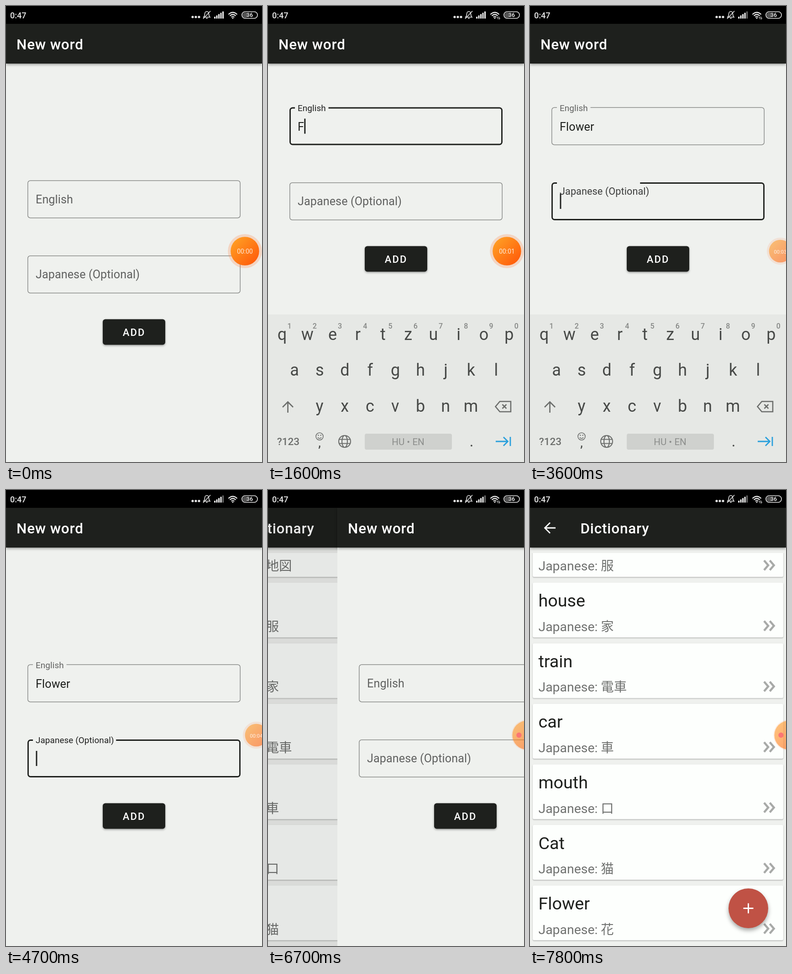
Animation of 561 by 998 pixels, one loop 8000 ms. Source, as an HTML page with a canvas:

```html
<!DOCTYPE html>
<html lang="en">
<head>
<meta charset="utf-8">
<title>New word</title>
<style>
html, body { margin: 0; width: 100%; height: 100%; overflow: hidden; background: #eff1ee; }
canvas { display: block; }
</style>
</head>
<body>
<canvas id="stage" width="561" height="998"></canvas>
<script>
const W = 561, H = 998, LOOP = 8000;
const c = document.getElementById('stage').getContext('2d');
const INK = '#1e201d', PAPER = '#eff1ee', KEY = '#474947', SOFT = '#6c6e6c';
const FONT = 'Roboto, "Noto Sans CJK JP", "Noto Sans CJK", sans-serif';

// Words come from a dictionary list; typed letters appear when their key is released.
const WORDS = [['map', '地図'], ['clothes', '服'], ['house', '家'], ['train', '電車'],
  ['car', '車'], ['mouth', '口'], ['Cat', '猫'], ['Flower', '花']];
const TYPED = [1450, 2000, 2250, 2500, 2720, 2900];
const ROWS = [['qwertzuiop', 31, 719], ['asdfghjkl', 58, 797], ['yxcvbnm', 113, 876]];
const FOCUS_EN = 60, FOCUS_JA = 3520, CLEAR = 5760;

const ramp = (t, a, b) => Math.min(1, Math.max(0, (t - a) / (b - a)));
const smooth = u => u * u * (3 - 2 * u);
const easeOut = u => 1 - (1 - u) ** 3;
const mix = (a, b, u) => a + (b - a) * u;

function text(s, x, y, size, color, { weight = 400, align = 'left', space = 0 } = {}) {
  c.font = `${weight} ${size}px ${FONT}`;
  c.letterSpacing = space + 'px';
  c.textAlign = align;
  c.fillStyle = color;
  c.fillText(s, x, y);
  c.letterSpacing = '0px';
}
function box(x, y, w, h, r, color) {
  c.beginPath();
  c.roundRect(x, y, w, h, r);
  c.fillStyle = color;
  c.fill();
}
function disc(x, y, r, color) {
  c.beginPath();
  c.arc(x, y, r, 0, 7);
  c.fillStyle = color;
  c.fill();
}
function line(path, color, width, dx = 0, dy = 0) {
  c.save();
  c.translate(dx, dy);
  c.strokeStyle = color;
  c.lineWidth = width;
  c.stroke(new Path2D(path));
  c.restore();
}
function shadowed(blur, dy, alpha, draw) {
  c.save();
  c.shadowColor = `rgba(0,0,0,${alpha})`;
  c.shadowBlur = blur;
  c.shadowOffsetY = dy;
  draw();
  c.restore();
}
function shifted(x, y, draw) {
  c.save();
  c.translate(x, y);
  draw();
  c.restore();
}

function statusBar(t) {
  c.fillStyle = '#000';
  c.fillRect(0, 0, W, 39);
  const ink = '#e8e8e8';
  text('0:47', 9, 26.5, 18, ink, { weight: 500 });
  for (let i = 0; i < 3; i++) disc(409 + i * 7, 24, 2.6, ink);
  line('M433 24.5h14c-2-2-2.500-4-2.500-6.500c0-8-9-8-9 0c0 2.500-.5 4.500-2.500 6.500zM438 27h4M432 28L448 11', ink, 1.6);
  for (let i = 0; i < 5; i++) {
    const h = 4 + i * 2.9;
    c.fillStyle = i == 4 && t > 1800 ? '#666' : ink;
    c.fillRect(456 + i * 4.5, 27.5 - h, 3.2, h);
  }
  line('M487.500 18.500q9.500-9 19 0M490.500 21.500q6.500-6 13 0', ink, 2.2);
  line('M493.500 24.500q3.500-3 7 0', ink, 2);
  disc(497, 26.500, 1.500, ink);
  if ((t > 800 && t < 4100) || t >= 6400) {
    c.fillStyle = '#000';
    c.fillRect(501, 22, 9, 8);
    line('M504 29v-5l-1.500 2M507 23.500v5l1.500-2', ink, 1.1);
  }
  box(518.5, 14.5, 12, 11, 5, '#555');
  c.beginPath();
  c.roundRect(517, 12.5, 34, 14.5, 7);
  c.strokeStyle = ink;
  c.lineWidth = 1.6;
  c.stroke();
  text('36', 534, 24.3, 12.5, '#fff', { weight: 500, align: 'center' });
}

function header(title, x) {
  shadowed(6, 2, .4, () => {
    c.fillStyle = INK;
    c.fillRect(0, 39, W, 87);
  });
  text(title, x, 95, 31.4, '#fff', { weight: 500, space: .85 });
}

function field(y, label, value, t, on, off) {
  const active = t >= on && t < off, raised = t >= on && t < CLEAR;
  const p = smooth(ramp(t, on, on + 150)) * (1 - smooth(ramp(t, CLEAR, CLEAR + 150)));
  const lw = active ? 2.9 : 1.5;
  c.beginPath();
  c.roundRect(47 + lw / 2, y + lw / 2, 467 - lw, 83 - lw, 5.5);
  c.strokeStyle = active ? INK : '#8b8d8b';
  c.lineWidth = lw;
  c.stroke();
  if (raised) {
    c.font = `18.86px ${FONT}`;
    c.fillStyle = PAPER;
    c.fillRect(59, y - 1, c.measureText(label).width + 12.5, 6);
  }
  const g = Math.round(mix(96, 30, active ? p : 0));
  text(label, 65, y + mix(50.3, 8, p), mix(25.14, 18.86, p), `rgb(${g},${g + 1},${g})`, { space: .1 });
  text(value, 65, y + 51.5, 25.14, INK, { space: .1 });
  if (!active) return;
  const w = c.measureText(value).width;
  const last = Math.max(on + 60, ...TYPED.filter(k => k <= t && k > on && k < off));
  if ((t - last) % 1000 < 500) {
    c.fillStyle = INK;
    c.fillRect(65.5 + w, y + 25, 2.9, 33);
  }
}

function form(t) {
  c.fillStyle = PAPER;
  c.fillRect(0, 39, W, H);
  header('New word', 23);
  const up = t >= 550 && t < 4500 ? -160 : 0;
  shifted(0, up, () => {
    const count = t < CLEAR ? TYPED.filter(k => k <= t).length : 0;
    field(381.5, 'English', 'Flower'.slice(0, count), t, FOCUS_EN, FOCUS_JA);
    field(546, 'Japanese (Optional)', '', t, FOCUS_JA, CLEAR);
    shadowed(4, 2, .35, () => box(212, 685.5, 137, 56, 5.7, INK));
    if (t > 5280 && t < 6050) {
      c.save();
      c.beginPath();
      c.roundRect(212, 685.5, 137, 56, 5.7);
      c.clip();
      disc(280, 713, mix(15, 85, easeOut(ramp(t, 5280, 5600))),
        `rgba(255,255,255,${.16 * (1 - ramp(t, 5700, 6050))})`);
      c.restore();
    }
    text('ADD', 255.7, 722, 22, '#fff', { weight: 500, space: 2.1 });
  });
}

function keyboard(t) {
  const shown = easeOut(ramp(t, 270, 620)) * (1 - ramp(t, 4430, 4640) ** 2);
  if (!shown) return;
  shifted(0, 323 * (1 - shown), () => {
    c.fillStyle = '#e6e8e5';
    c.fillRect(0, 675, W, 323);
    const caps = t < TYPED[0];
    const glyph = k => caps ? k.toUpperCase() : k;
    const center = { align: 'center' };
    ROWS.forEach(([keys, x0, y], r) => [...keys].forEach((k, i) => {
      const x = x0 + i * 55.25;
      text(glyph(k), x, y + 11.5, 36, KEY, center);
      if (!r) text((i + 1) % 10, x + 16, 705.5, 16, '#858785', { weight: 500, align: 'center' });
    }));
    line('M43.500 890V867M32 878L43.500 866.500L55 878', SOFT, 2.7);
    line('M508 865.500h24v22.500h-24l-9.500-11.250zM513.500 872l9 9m0-9l-9 9', SOFT, 2.6);
    text('?123', 44.5, 961, 22.5, SOFT, { weight: 500, align: 'center' });
    line('M121 942a8 8 0 1 1-16 0a8 8 0 1 1 16 0M109 944q4 5 8 0', SOFT, 1.6);
    disc(110.3, 939.5, 1.3, SOFT);
    disc(115.7, 939.5, 1.3, SOFT);
    text(',', 113, 965, 25, KEY, { weight: 500, align: 'center' });
    line('M13 0a13 13 0 1 1-26 0a13 13 0 1 1 26 0M6 0a6 13 0 1 1-12 0a6 13 0 1 1 12 0M-12-4.500h24M-12 4.500h24', SOFT, 2.1, 168, 953);
    box(212, 936, 191, 35, 4, '#cfd1ce');
    text('HU • EN', 307, 960.5, 20.6, '#8c8e8c', center);
    text('.', 446, 964, 27, KEY, { weight: 500, align: 'center' });
    if (t >= 3400 && t < 3540) disc(516, 953, 28, 'rgba(0,0,0,.08)');
    line('M499 953h26M516 943.500L525.500 953L516 962.500M531 943v20', '#2ba0dc', 2.8);

    TYPED.forEach((end, n) => {
      if (t < end - 120 || t >= end) return;
      const k = 'flower'[n];
      const [keys, x0, y] = ROWS.find(row => row[0].includes(k));
      const x = x0 + keys.indexOf(k) * 55.25;
      shadowed(5, 1, .25, () => box(x - 32, y - 112, 64, 147, 8, '#f7f9f6'));
      text(glyph(k), x, y - 62, 42, KEY, center);
    });
  });
}

function dictionary(t) {
  c.fillStyle = PAPER;
  c.fillRect(0, 39, W, H);
  const scroll = 132.55 * smooth(ramp(t, 7540, 7790));
  c.save();
  c.beginPath();
  c.rect(0, 138, W, H);
  c.clip();
  WORDS.forEach(([en, ja], i) => {
    const y = 70.3 + i * 132.55 - scroll;
    if (i == 7 && t < 7500) return;
    shadowed(2.5, 1.2, .3, () => box(6, y, 549, 120, 3, '#fdfffd'));
    text(en, 18.5, y + 52.5, 37.7, INK);
    text('Japanese: ' + ja, 18.5, y + 106, 28.4, '#707270');
    line('M513 84l9 10.500l-9 10.500M525.500 84l9 10.500l-9 10.500', '#a8aaa8', 4.6, 0, y);
  });
  c.restore();
  header('Dictionary', 110.5);
  line('M56 83H33M44 71.500L32.500 83L44 94.500', '#fff', 2.8);
  shadowed(10, 5, .35, () => disc(478.5, 915.5, 43.5, '#c05245'));
  line('M467.500 915.500h22M478.500 904.500v22', '#fff', 2.9);
}

// The floating recorder first docks at the right edge, then tucks itself away.
function recorder(t) {
  const dock = smooth(ramp(t, 2750, 3080)), tuck = smooth(ramp(t, 5300, 5600));
  const x = mix(mix(523.5, 548.5, dock), 567, tuck), y = 536.5;
  const r = mix(mix(31.3, 24.8, dock), 31.5, tuck);
  const g = c.createLinearGradient(x - r * .7, y - r * .7, x + r * .7, y + r * .7);
  g.addColorStop(0, '#ff9a22');
  g.addColorStop(1, '#ff600c');
  c.save();
  c.globalAlpha = mix(1, .55, dock);
  disc(x, y, r + mix(r * .19, 2, tuck), 'rgba(255,120,60,.24)');
  disc(x, y, r, g);
  c.restore();
  if (tuck < .5) {
    const s = t < 1150 ? 0 : t < 2150 ? 1 : t < 3100 ? 2 : t < 4300 ? 3 : t < 5300 ? 4 : 5;
    text('00:0' + s, x, y + 5, mix(13.9, 11.2, dock), 'rgba(255,255,255,.82)', { align: 'center' });
  } else disc(550, y, 5.7, '#fb7674');
}

function draw(t) {
  c.clearRect(0, 0, W, H);
  const rest = 1 - easeOut(ramp(t, 6650, 7160));
  if (rest < 1) {
    shifted(-219 * rest, 0, () => dictionary(t));
    c.fillStyle = `rgba(0,0,0,${Math.min(.09, rest * .75)})`;
    c.fillRect(0, 39, W, H);
  }
  if (rest > 0) shifted(W * (1 - rest), 0, () => form(t));
  keyboard(t);
  recorder(t);
  statusBar(t);
}

const start = performance.now();
function tick() {
  draw((performance.now() - start) % LOOP);
  requestAnimationFrame(tick);
}
tick();
</script>
</body>
</html>
```
